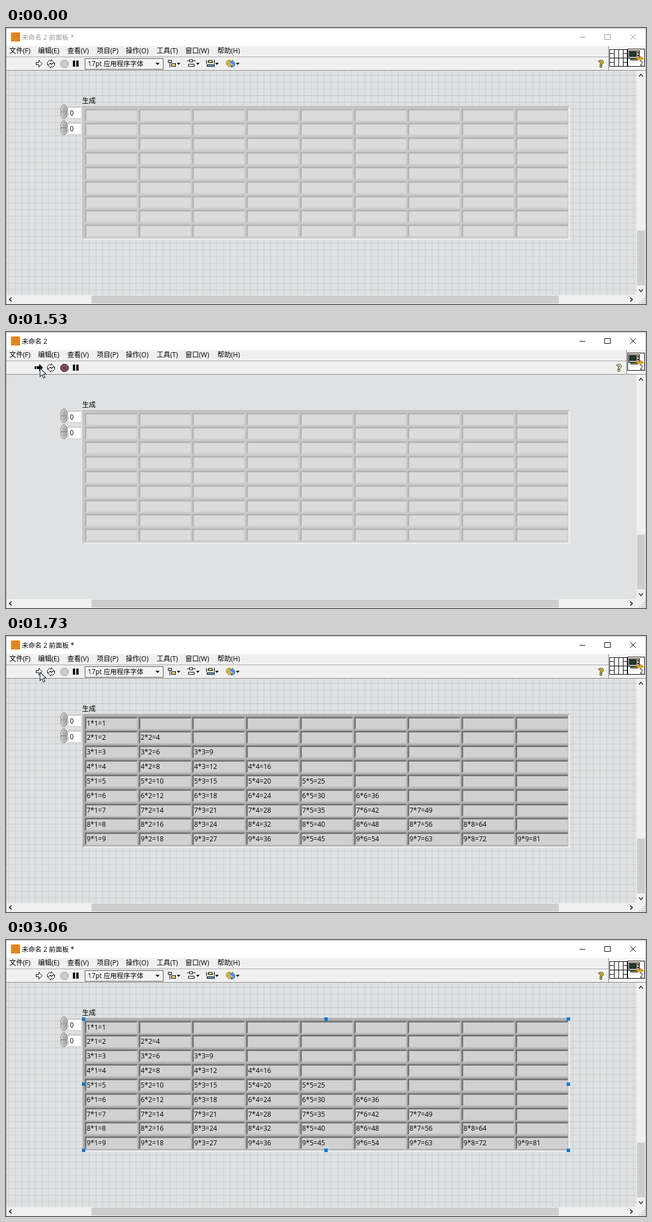
These frames come from a looping animation (1138x492 px, 3800 ms). An HTML page with a canvas:

```html
<!DOCTYPE html>
<html lang="zh-CN">
<head>
<meta charset="utf-8">
<title>面板</title>
<style>
html, body { margin: 0; width: 100%; height: 100%; overflow: hidden; background: #f0f0f0; }
canvas { display: block; width: 1138px; height: 492px; }
</style>
</head>
<body>
<canvas id="stage" width="1138" height="492"></canvas>
<script>
const c = document.getElementById('stage').getContext('2d');
const LOOP = 3800, STEP = 66.6;
const COL = 95.7, ROW = 25.85, GRID = 11.95;
const INK = '#000', BAR = '#f0f0f0';

function rect(x, y, w, h, fill) {
  c.fillStyle = fill;
  c.fillRect(x, y, w, h);
}

function box(x, y, w, h, fill, line) {
  rect(x, y, w, h, line);
  rect(x + 1, y + 1, w - 2, h - 2, fill);
}

function shape(d, fill, line, width = 1, x = 0, y = 0) {
  const path = new Path2D(d);
  c.save();
  c.translate(x, y);
  if (fill) { c.fillStyle = fill; c.fill(path); }
  if (line) { c.strokeStyle = line; c.lineWidth = width; c.stroke(path); }
  c.restore();
}

function text(s, x, y, color = INK, size = 12, weight = '') {
  c.font = `${weight} ${size}px "Open Sans", "Noto Sans CJK SC", "Noto Sans CJK", sans-serif`;
  c.fillStyle = color;
  c.fillText(s, x, y);
}

function titleBar(active, edit) {
  const ink = active ? INK : '#999';
  rect(0, 0, 1138, 32, '#fff');
  rect(9, 8, 16, 16, '#e08420');
  text(edit ? '未命名 2 前面板 *' : '未命名 2', 28, 20.5, ink, 11.8);
  shape('M1020 16.5h10M1064.5 11.5h10v9h-10zM1110 11l10 10M1120 11l-10 10', null, ink);
}

function menuBar() {
  rect(0, 32, 1138, 44, BAR);
  const items = ['文件(F)', '编辑(E)', '查看(V)', '项目(P)', '操作(O)', '工具(T)', '窗口(W)', '帮助(H)'];
  const xs = [6, 57, 109, 161.5, 213, 268, 319, 376];
  items.forEach((s, i) => text(s, xs[i], 44.5));
  rect(0, 51, 1138, 1, '#a6a6a6');
}

function runButton(edit, hover) {
  if (hover) box(50, 54, 19, 20, '#d5e8f6', '#2a86cf');
  if (edit) shape('M53.5 61.5h5v-4l6 6-6 6v-4h-5z', '#fff', INK);
  else shape('M51 61h3v5h-3zM55 61h4v-4l7 6.5-7 6.5v-4h-4z', INK);
}

function toolIcons() {
  // align
  shape('M291.5 57v13M297 66.5h5', null, INK);
  box(288, 57, 7, 5, '#fff', INK);
  box(294, 63, 8, 6, '#e7d27a', INK);
  // distribute
  shape('M322 58.5h15', null, INK);
  box(326, 56, 6, 5, '#fff', INK);
  box(324, 64, 11, 5, '#fff', INK);
  // resize
  shape('M356.5 57v7M370.5 57v7M358 60.5h11', null, INK);
  box(360, 57, 7, 5, '#e7d27a', INK);
  box(357, 65, 14, 4, '#79b6d6', INK);
  // reorder
  shape('M399 57c-9-1-10 9-3 11v2l5-4-5-4v2c-3-1-2-4 3-4z', '#e5b93b', '#665520', .7);
  shape('M400 70c9 0 9-10 3-11v-2l-5 4 5 4v-2c3 1 2 4-3 4z', '#5b9ccc', '#23465f', .7);
  for (const x of [304, 338, 372, 409]) shape('M0 0h6l-3 4z', INK, null, 1, x, 62);
}

function toolBar(edit, hover) {
  runButton(edit, hover);
  const turn = 'M73.5 65.500v-4l3-3h4v-2l5 5-5 4v-2h-3v2z';
  shape(turn, '#fff', INK);
  shape('M86.500 62.500v4l-3 3h-4v2l-5-5 5-4v2h3v-2z', '#fff', INK);
  shape('M101 57.5h6l4 4v5l-4 4h-6l-4-4v-5z', edit ? '#d2c8bd' : '#704340', edit ? '#a39c94' : '#2d2020');
  if (!edit) shape('M102 59.5h4l3 3v3l-3 3h-4l-3-3v-3z', null, '#a47873');
  rect(119, 58, 4, 11, INK);
  rect(125, 58, 4, 11, INK);
  if (edit) {
    box(140, 54, 140, 20, '#f4f4f4', '#555');
    text('17pt 应用程序字体', 145.5, 68, INK, 11.8);
    shape('M266 62h7l-3.5 4z', INK);
    toolIcons();
  }
  const x = edit ? 1054.5 : 1086.5;
  c.lineWidth = 2;
  c.strokeStyle = '#4a4320';
  c.font = 'bold 16px "Open Sans", sans-serif';
  c.strokeText('?', x, 69.5);
  text('?', x, 69.5, edit ? '#f0cc25' : '#f3eecb', 16, 'bold');
  rect(0, 75, 1138, 1, '#858585');
  paneIcons(edit);
}

function paneIcons(edit) {
  const left = edit ? 1071 : 1103;
  rect(left, 32, 1138 - left, 43, '#f6f6f6');
  rect(left, 32, 1, 43, '#777');
  if (edit) {
    box(1073, 38, 32, 31, '#fff', INK);
    shape('M1081.5 38v31M1089.5 38v31M1097.5 38v31M1074 53.5h30', null, INK);
    shape('M1074 45.5h8M1074 61.5h8M1097 45.5h8M1097 61.5h8', null, INK);
  }
  box(1105, 37, 31, 32, '#fff', INK);
  box(1107, 40, 20, 15, '#b3ad8c', INK);
  box(1109, 42, 12, 9, '#23392f', INK);
  rect(1123, 43, 2, 2, INK);
  rect(1123, 48, 2, 2, INK);
  rect(1110, 55, 14, 3, '#6d6853');
  shape('M1121 53h6v-3l7 4.500-7 4.500v-3h-6z', '#e9ae2c', '#8c6516', .7);
  text('2', 1127, 66.5, INK, 10);
}

function panel(edit) {
  rect(0, 76, 1121, 400, '#dfe1e2');
  if (!edit) return;
  for (let x = 4; x < 1121; x += GRID) rect(x, 76, 1, 400, '#cbcdce');
  for (let y = 120 - 3 * GRID; y < 476; y += GRID) rect(0, y, 1121, 1, '#cbcdce');
  rect(0, 120, 1121, 1, '#bcbebf');
}

function scrollBars() {
  rect(1121, 76, 17, 416, BAR);
  rect(0, 476, 1138, 16, BAR);
  rect(1122, 361, 14, 98, '#cdcdcd');
  rect(152, 477, 831, 14, '#cdcdcd');
  shape('M1125.5 86.5l3.5-4 3.5 4M1125.5 466l3.5 4 3.5-4M10 480.5l-4 3.5 4 3.5M1110 480.5l4 3.5-4 3.5', null, '#333', 1.7);
  for (let i = 0; i < 3; i++)
    for (let j = 0; j <= i; j++) rect(1134 - 4 * j, 481 + 4 * i, 2, 2, '#b5b5b5');
  rect(0, 0, 1138, 1, '#b9b9b9');
  rect(0, 0, 1, 492, '#b9b9b9');
  rect(1137, 0, 1, 492, '#b9b9b9');
}

function indexBox(y) {
  const g = c.createLinearGradient(97, 0, 109, 0);
  g.addColorStop(0, '#dedede');
  g.addColorStop(1, '#a8a8a8');
  shape('M97.5 149v-7l4-5h3l4 5v7zM97.5 150h11v7l-4 5h-3l-4-5z', g, '#858585', 1, 0, y);
  shape('M100.5 146l2.5-5 2.5 5zM100.5 153l2.5 5 2.5-5z', '#ddd', '#777', .8, 0, y);
  rect(110, 140 + y, 23, 22, '#c4c4c4');
  rect(111, 142 + y, 22, 19, '#fff');
  text('0', 113.5, 155.5 + y);
}

function cell(k, first, busy) {
  const row = Math.floor(k / 9), col = k % 9;
  const x = Math.round(140 + COL * col), y = Math.round(143.5 + ROW * row);
  const live = k >= first && k < busy;
  rect(x - 2, y - 2, 96, 26, live ? '#b0b0b0' : '#cacaca');
  if (k === busy) return rect(x - 2, y - 1, 95, 25, '#a5a5a5');
  rect(x, y, 94, 23, live ? '#c6c6c6' : '#d0d0d0');
  shape('M0 0h94l-2 3h-89v18l-3 2z', live ? '#777' : '#b5b5b5', null, 1, x, y);
  rect(x + 3, y + 3, 89, 18, live ? '#d2d1d2' : '#dbdbdb');
  if (live && col <= row)
    text(`${row + 1}*${col + 1}=${(row + 1) * (col + 1)}`, x + 3.5, y + 15.5);
}

// cells from index first up to busy are lit; busy is the one being repainted
function table(first, busy, edit) {
  text('生成', 135.5, 133.5);
  indexBox(0);
  indexBox(28.5);
  rect(136, 139, 867, 239, '#ececec');
  shape('M136 139h867l-4 3v233H139l-3 3z', busy > 80 ? '#b0b0b0' : '#c2c2c2');
  for (let k = 0; k < 81; k++) cell(k, first, busy);
}

function handles() {
  for (const x of [138, 569, 1000])
    for (const y of [141, 257, 375])
      if (x !== 569 || y !== 257) rect(x - 3, y - 3, 6, 6, '#0878d4');
}

function pointer(p) {
  if (!p) return;
  const [x, y] = p.map(Math.round);
  if (y < 80 || y >= 474)
    shape('M.5.5v15l3.5-3.3 2.6 5.7 2.6-1.2-2.6-5.4h5z', '#e4f0fb', '#1b2838', 1.1, x, y);
  else if (x > 137 && x < 1002 && y > 139 && y < 377)
    shape('M-3 -7.5h2.5l1 1 1-1h2.5M.5-6.5v13M-3 7.5h2.5l1-1 1 1h2.5', null, INK, 1.2, x, y);
  else
    shape('M-6 .5h13M.5-6v13', null, INK, 1, x, y);
}

const mix = (a, b, k) => a + (b - a) * k;
const move = (a, b, kx, ky = kx) => [mix(a[0], b[0], kx), mix(a[1], b[1], ky)];
const stepAt = (t, start, last) => Math.min(last, Math.floor((t - start) / STEP));

const ENTRY = [1039, 481], REST = [92, 102], BUTTON = [60, 64];
const LEAVE = [68, 69], BELOW = [873, 395], EXIT = [1054, 476];

function pointerAt(t) {
  if (t < 250) return null;
  if (t < 790) {
    const left = 1 - stepAt(t, 250, 7) / 7;
    return move(ENTRY, REST, 1 - left ** 2.58, 1 - left ** 1.9);
  }
  if (t < 2260) {
    const k = (stepAt(t, 790, 4) + 1) / 5;
    return move(REST, BUTTON, 1 - (1 - k) ** 2);
  }
  if (t < 2790) {
    const k = stepAt(t, 2260, 7) / 7;
    return move(LEAVE, BELOW, k * k * (3 - 2 * k));
  }
  const i = stepAt(t, 2790, 4);
  return i < 4 ? move(BELOW, EXIT, (i + 1) / 4) : null;
}

function draw(t) {
  const run = t < 1460 ? -1 : stepAt(t, 1460, 4);
  const edit = run < 1 || run === 4;
  const p = pointerAt(t);
  const hover = run < 1 && p && p[0] >= 50 && p[0] < 69 && p[1] < 74;
  const [first, busy] = run === 4 ? [0, 81] : run === 3 ? [5, 79] : run === 2 ? [5, 15] : [0, -1];
  panel(edit);
  titleBar(run >= 0, edit);
  menuBar();
  toolBar(edit, hover);
  table(first, busy, edit);
  if (stepAt(t, 2260, 7) >= 6) handles();
  scrollBars();
  pointer(p);
}

const begin = performance.now();
function tick() {
  draw((performance.now() - begin) % LOOP);
  requestAnimationFrame(tick);
}
tick();
</script>
</body>
</html>
```
